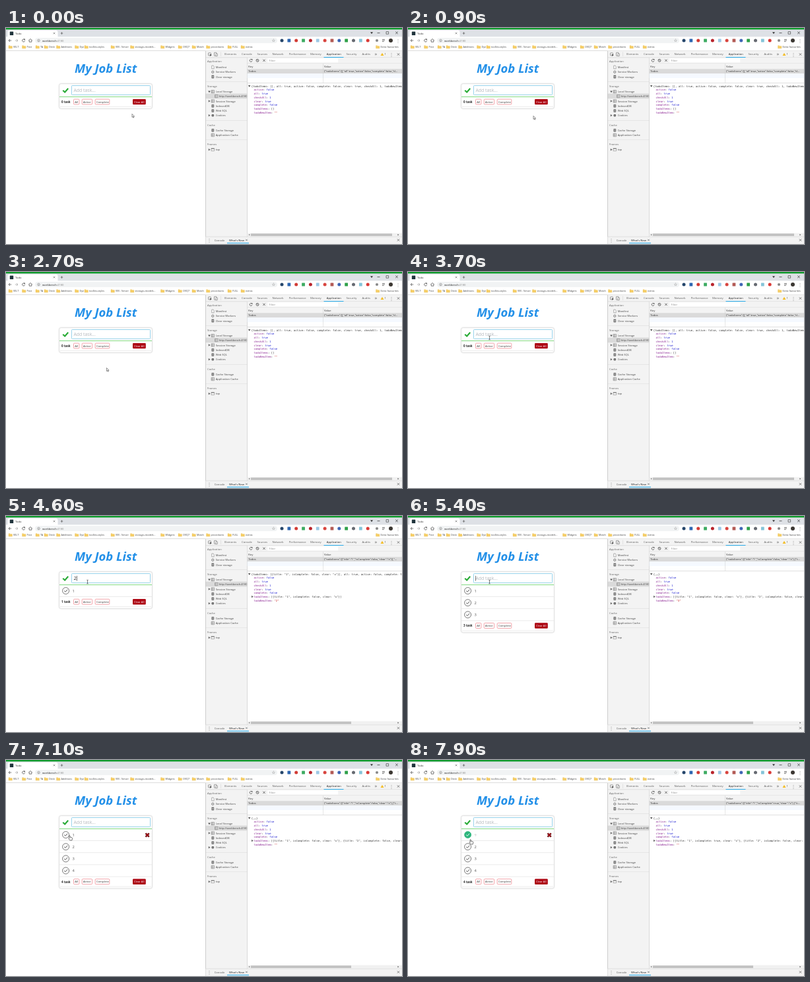
Animation of 600 by 328 pixels, one loop 8000 ms. Source, as an HTML page with a canvas:

```html
<!DOCTYPE html>
<html lang="en">
<head>
<meta charset="utf-8">
<title>Todo</title>
<style>
html, body { margin: 0; width: 100%; height: 100%; overflow: hidden; background: #fff; }
canvas { display: block; width: 600px; height: 328px; }
</style>
</head>
<body>
<canvas id="stage"></canvas>
<script>
const LOOP = 8000, ROW = 18.15, CARD_TOP = 104.5;
const UI = '"Open Sans", "Noto Sans", sans-serif';
const MONO = '"DejaVu Sans Mono", monospace';
const SYM = '"DejaVu Sans", sans-serif';
const canvas = document.getElementById('stage');
const g = canvas.getContext('2d');
const dpr = window.devicePixelRatio || 1;
canvas.width = 600 * dpr;
canvas.height = 328 * dpr;

// time, tasks in the list, text in the input, text in storage
const events = [
  [0, 0, '', ''], [4050, 0, '1', '1'], [4300, 1, '', '1'], [4500, 1, '2', '2'],
  [4750, 2, '', '2'], [5000, 2, '3', '3'], [5300, 3, '', '3'],
  [5650, 3, '4', '4'], [5950, 4, '', '4'], [6350, 4, '', '']
];
const CLICK = 7600;

// time, x, y of the pointer
const path = [
  [0, 191, 131], [900, 190, 134], [1500, 183, 142], [1900, 179, 143],
  [2400, 166, 174], [2800, 150, 141], [3400, 123, 100], [6350, 123, 100],
  [6700, 114, 171], [7050, 96, 115], [7200, 95, 115], [7500, 94, 121], [8000, 94, 121]
];

function rect(x, y, w, h, fill) {
  g.fillStyle = fill;
  g.fillRect(x, y, w, h);
}

function box(x, y, w, h, r, fill, stroke, lw = 0.7) {
  g.beginPath();
  g.roundRect(x, y, w, h, r);
  if (fill) { g.fillStyle = fill; g.fill(); }
  if (stroke) { g.strokeStyle = stroke; g.lineWidth = lw; g.stroke(); }
}

function dot(x, y, r, fill, stroke, lw) {
  box(x - r, y - r, 2 * r, 2 * r, r, fill, stroke, lw);
}

function shape(d, x, y, fill, stroke, lw = 0.7) {
  g.save();
  g.translate(x, y);
  const p = new Path2D(d);
  if (fill) { g.fillStyle = fill; g.fill(p); }
  if (stroke) { g.strokeStyle = stroke; g.lineWidth = lw; g.stroke(p); }
  g.restore();
}

// y is the baseline; returns the end of the text
function text(s, x, y, size = 4.1, color = '#444', font = UI, style = '') {
  g.font = `${style} ${size}px ${font}`;
  g.fillStyle = color;
  g.fillText(s, x, y);
  return x + g.measureText(s).width;
}

function icon(s, x, y, size = 6, color = '#666') {
  g.textAlign = 'center';
  text(s, x, y + size * 0.36, size, color, SYM);
  g.textAlign = 'left';
}

const cross = (x, y, r, color, lw) =>
  shape(`M${-r} ${-r}L${r} ${r}M${r} ${-r}L${-r} ${r}`, x, y, null, color, lw);

const arrowDown = (x, y) => shape('M-1.8 -1.2H1.8L0 1.6Z', x, y, '#555');
const arrowRight = (x, y) => shape('M-1.2 -1.8V1.8L1.6 0Z', x, y, '#666');

function reload(x, y, r = 2) {
  shape(`M${r * 0.7} ${-r * 0.7}A${r} ${r} 0 1 0 ${r} ${r * 0.3}`, x, y, null, '#555', 0.8);
  shape('M0 -2.4H2.4V0Z', x, y, '#555');
}

function folder(x, y) {
  shape('M0 -2H2L2.8 -1.2H5.4V2.2H0Z', x, y, '#f6cf68', '#e3b445', 0.3);
}

function drawBrowser() {
  rect(0, 0, 600, 13.5, '#dee1e6');
  rect(0, 0, 600, 2.3, '#119b2e');
  box(2.5, 3.6, 76, 11, [3, 3, 0, 0], '#fff');
  rect(0, 13.5, 600, 20.5, '#fff');
  box(5.8, 5.6, 5.4, 5.4, 0.5, '#20343c');
  text('Todo', 14, 9.8, 4.1, '#333');
  cross(73, 8, 1.3, '#666', 0.6);
  shape('M-1.8 0H1.8M0 -1.8V1.8', 84.5, 8, null, '#555', 0.7);
  shape('M-2 -1.2H2L0 1.6Z', 554, 7.5, '#333');
  rect(562.5, 7.2, 4, 0.7, '#333');
  box(576, 5.6, 3.6, 3.6, 0, null, '#333', 0.6);
  cross(592, 7.3, 1.8, '#333', 0.7);

  shape('M2.2 0H-2M0 -2L-2 0L0 2', 6, 19, null, '#555', 0.8);
  shape('M-2.2 0H2M0 -2L2 0L0 2', 16, 19, null, '#aaa', 0.8);
  reload(26.5, 19);
  shape('M-2.8 0L0 -2.5L2.8 0M-1.8 -.5V2.2H1.8V-.5', 37, 19, null, '#555', 0.8);
  box(44, 14.9, 367, 8.2, 4.1, '#f1f3f4');
  dot(49.5, 19, 1.8, null, '#666', 0.5);
  rect(49.2, 18.7, 0.6, 1.4, '#666');
  const end = text('workbench', 55, 20.5, 4.2, '#222');
  text(':4180', end, 20.5, 4.2, '#888');
  icon('☆', 405.5, 19, 6.5, '#555');

  ['#25466b', '#2d66b0', '#d23b35', '#3dab62', '#b8242c', '#9cc8e6', '#d8453f',
   '#b35a55', '#3f66b5', '#2fa04a', '#666a72', '#85c4d8', '#d93a36'
  ].forEach((c, i) => i % 2
    ? box(415.6 + i * 10.85, 16.6, 4.8, 4.8, 0.5, c)
    : dot(418 + i * 10.85, 19, 2.5, c));
  dot(562, 19, 2.1, '#888');
  shape('M-2 -1.2H2M-2 .4H2M-2 2H.5', 572, 18.6, null, '#555', 0.7);
  dot(583, 19, 3, '#3c3833');
  icon('⋮', 594, 19, 7);

  [[4, 'VELT'], [24.5, 'Post'], [45, 'TA'], [58, 'Desk'], [76.5, 'Additions'],
   [104.5, 'Dye'], [119, 'toolkit+styles'], [159, 'VM - Server'],
   [188.5, 'storage+models...'], [234.5, 'Widgets'], [261, 'OVQ7'], [282, 'Match'],
   [303.5, 'procedures'], [336, 'FULL'], [356, 'extras'], [560.5, 'Extra favourites']
  ].forEach(([x, s]) => {
    folder(x, 28.7);
    text(s, x + 7, 30.2, 3.75, '#444');
  });
  rect(0, 34, 600, 0.8, '#d4d4d4');
}

const tick = (x, y, k, color, lw) =>
  shape(`M${-k} 0L${-k * 0.25} ${k * 0.7}L${k} ${-k * 0.75}`, x, y, null, color, lw);

function button(s, x, y, w) {
  box(x, y, w, 8, 1.2, '#fff', '#ee8088', 0.7);
  text(s, x + 1.7, y + 5.5, 4.2, '#333');
}

function drawCard(s, hover, done, caret) {
  text('My Job List', 104, 67.6, 18.4, '#2390e8', UI, 'italic bold');
  const foot = CARD_TOP + s.count * ROW;
  g.save();
  g.shadowColor = 'rgba(0,0,0,.12)';
  g.shadowBlur = 2 * dpr;
  box(80.5, 84.5, 141, foot - 66.5, 3, '#fff', '#e0e0e0', 0.7);
  g.restore();
  rect(82, foot + 14.7, 138, 0.6, '#e2e2e2');

  tick(90.2, 94.7, 4, '#28ab35', 2.1);
  box(98.7, 86.7, 120.6, 15.6, 1.8, '#e6f5fc');
  box(99.5, 87.5, 119, 14, 1, '#fff', '#86cbe8', 0.8);
  const end = s.input ? text(s.input, 102.5, 97.4, 7.8, '#333') : 102.3;
  if (!s.input) text('Add task...', 102.5, 97.2, 6.9, '#b3b8bd');
  if (caret) rect(end, 90.8, 0.6, 7.8, '#222');
  rect(81, 104, 140, 1, '#82d982');

  for (let i = 0; i < s.count; i++) {
    const y = CARD_TOP + (i + 0.5) * ROW, checked = done && i == 0;
    dot(90.6, y, 5, checked ? '#2eb67d' : '#fff', checked ? '#2eb67d' : '#555', 0.8);
    tick(90.6, y, 2.5, checked ? '#fff' : '#444', 0.9);
    text(String(i + 1), 100.5, y + 2.1, 5.8, checked ? '#c4c4c4' : '#555');
    if (checked) rect(100.2, y, 4, 0.5, '#c4c4c4');
    if (hover == i) {
      cross(214.2, y + 0.4, 2.6, '#401010', 2.4);
      cross(214.2, y + 0.4, 2.4, '#b5121b', 1.4);
    }
    rect(81, y + ROW / 2 - 0.3, 140, 0.6, '#dedede');
  }

  text(s.count + ' task', 84, foot + 9.4, 4.5, '#222', UI, 'bold');
  button('All', 102.5, foot + 3.6, 8.4);
  button('Active', 115.2, foot + 3.6, 15.4);
  button('Complete', 135.2, foot + 3.6, 21.6);
  box(192, foot + 3.4, 19.8, 8.4, 1.2, '#ad0613');
  text('Clear All', 193.9, foot + 9.2, 4.1, '#fff');
}

function cylinder(x, y) {
  box(x - 2, y - 2.4, 4, 4.8, 1.2, '#777');
  rect(x - 2, y - 0.9, 4, 0.4, '#ddd');
  rect(x - 2, y + 0.6, 4, 0.4, '#ddd');
}

function grid(x, y) {
  box(x - 2.2, y - 2.2, 4.4, 4.4, 0, '#fff', '#777', 0.6);
  shape('M-2.2 -.7H2.2M-2.2 .8H2.2M-.6 -2.2V2.2', x, y, null, '#777', 0.5);
}

function drawSidebar() {
  rect(302.5, 45, 63, 272, '#f3f3f3');
  rect(302.5, 99.6, 63, 7.7, '#dadada');
  [['Application', 52.4], ['Storage', 90], ['Cache', 148.5], ['Frames', 178]]
    .forEach(([s, y]) => text(s, 305, y, 4.2, '#666'));
  [81, 140, 169.5].forEach(y => rect(302.5, y, 63, 0.6, '#ddd'));
  [['Manifest', 59.5], ['Service Workers', 66.8], ['Clear storage', 74],
   ['Local Storage', 96.7], ['Session Storage', 111], ['IndexedDB', 118.3],
   ['Web SQL', 125.6], ['Cookies', 132.8], ['Cache Storage', 155.3],
   ['Application Cache', 162.6], ['top', 184.7]
  ].forEach(([s, y]) => text(s, 317.7, y + 1.5, 4.1, '#444'));
  text('http://workbench:4180', 322.7, 105, 4, '#444');
  shape('M-1.5 -2.4H.8L1.8 -1.4V2.4H-1.5Z', 313.3, 59.5, '#fff', '#777', 0.6);
  dot(313.3, 66.8, 1.6, null, '#777', 1);
  [74, 118.3, 125.6, 155.3].forEach(y => cylinder(313.3, y));
  [96.7, 111, 162.6].forEach(y => grid(313.3, y));
  grid(318.7, 103.5);
  dot(313.3, 132.8, 2, '#777');
  box(311, 182.8, 4.6, 3.8, 0, '#fff', '#777', 0.6);
  rect(311, 182.8, 4.6, 1, '#777');
  arrowDown(308, 96.7);
  [111, 132.8, 184.7].forEach(y => arrowRight(308, y));
  rect(365, 45, 0.7, 272, '#ccc');
}

function drawPanel(scrollEnd) {
  rect(302, 34.8, 298, 293.2, '#fff');
  rect(302, 34.8, 298, 10.2, '#f3f3f3');
  drawSidebar();
  rect(302, 34.8, 0.7, 293.2, '#bbb');
  box(306.5, 37.8, 4, 4, 0.5, null, '#666', 0.6);
  shape('M0 0L3.6 1.4L1.8 2L1.4 3.6Z', 308.5, 39.7, '#444');
  box(315.5, 37.3, 3.4, 5, 0.4, null, '#666', 0.6);
  box(318, 39, 2.4, 3.6, 0.3, '#fff', '#666', 0.6);
  rect(325, 36.5, 0.5, 6.5, '#ccc');
  [['Elements', 331], ['Console', 357], ['Sources', 380.5], ['Network', 403.5],
   ['Performance', 428.8], ['Memory', 461], ['Application', 485.7], ['Security', 515.5],
   ['Audits', 539.5]
  ].forEach(([s, x]) => text(s, x, 41.3, 4.25, s == 'Application' ? '#222' : '#5a5a5a'));
  rect(302, 44.6, 298, 0.6, '#ccc');
  rect(481.5, 44, 30, 1, '#27a9e8');
  icon('»', 560.5, 39.5, 7);
  shape('M0 -2.3L2.5 2H-2.5Z', 570, 40, '#f3bd29');
  text('1', 573.5, 41.3, 4.2, '#555');
  icon('⋮', 584, 40, 7);
  cross(594.5, 40, 1.7, '#555', 0.7);

  rect(365.7, 45.2, 234.3, 8.4, '#f3f3f3');
  reload(371, 49.3, 1.9);
  dot(381, 49.3, 2, null, '#555', 0.8);
  shape('M-1.4 -1.4L1.4 1.4', 381, 49.3, null, '#555', 0.8);
  cross(391, 49.3, 1.7, '#555', 0.8);
  box(396.3, 46.2, 107, 6.4, 0, '#fff');
  text('Filter', 398.5, 50.9, 4.1, '#888');
  rect(365.7, 53.6, 234.3, 0.6, '#ccc');
  rect(365.7, 54.2, 234.3, 7.8, '#f3f3f3');
  text('Key', 367.3, 59.7, 4.2, '#333');
  text('Value', 482, 59.7, 4.2, '#333');
  rect(365.7, 62, 234.3, 0.5, '#ccc');
  rect(365.7, 62.5, 234.3, 6.8, '#dadada');
  rect(365.7, 69.3, 234.3, 6.8, '#f5f9ff');
  rect(480, 54.2, 0.5, 29, '#ccc');
  rect(365.7, 83, 234.3, 0.6, '#ccc');
  text('Todos', 367.3, 67.4, 4.1, '#333');

  rect(365.7, 311.5, 234.3, 5, '#f1f1f1');
  rect(371, 312.2, scrollEnd - 371, 3.7, '#c1c1c1');
  shape('M1 -1.3V1.3L-.8 0Z', 368.3, 314, '#777');
  shape('M-1 -1.3V1.3L.8 0Z', 594.5, 314, '#555');
  rect(302.5, 316.7, 297.5, 11.3, '#f3f3f3');
  rect(302.5, 316.7, 297.5, 0.6, '#ccc');
  icon('⋮', 308, 322, 7);
  text('Console', 315.7, 323.6, 4.2, '#555');
  text("What's New", 338, 323.6, 4.2, '#222');
  cross(364.5, 322, 1.3, '#555', 0.6);
  rect(335, 326, 33, 1, '#27a9e8');
  cross(594.5, 322, 1.7, '#555', 0.7);
}

function drawStorage(s, done) {
  const items = Array.from({ length: s.count }, (_, i) =>
    `{title: "${i + 1}", isComplete: ${done && i == 0}, clear: "x"}`);
  const list = `[${items.join(', ')}]`;
  const quoted = list.replace(/(\w+): /g, '"$1":').replace(/, /g, ',');
  const value = `{"todoItems":${quoted},"all":true,"active":false,"complete":false,"clear":true}`;
  const code = (str, x, y, color) => text(str, x, y, 3.95, color, MONO);

  g.font = `4.1px ${UI}`;
  let n = value.length;
  while (g.measureText(value.slice(0, n) + '…').width > 112) n--;
  text(value.slice(0, n) + '…', 482, 67.4, 4.1, '#333');

  arrowDown(368.7, 88.2);
  code(s.count > 1 ? '{,…}' : `{todoItems: ${list}, all: true, active: false, ` +
    `complete: false, clear: true, checkAll: 1, todoNewItem: "${s.stored}"}`,
    371.8, 89.6, '#333');
  const blue = '#1c1ccf';
  [['active', 'false', blue], ['all', 'true', blue], ['checkAll', '1', blue],
   ['clear', 'true', blue], ['complete', 'false', blue], ['todoItems', list, '#333'],
   ['todoNewItem', `"${s.stored}"`, '#c41a16']
  ].forEach(([key, val, color], i) => {
    const y = 95.4 + i * 5.7;
    const colon = code(key, 375.6, y, '#8a2392');
    code(val, code(': ', colon, y, '#333'), y, color);
    if (key == 'todoItems' && s.count) arrowRight(373.2, y - 1.4);
  });
}

function pointerAt(t) {
  const i = path.findIndex((p, k) => k && t <= p[0]);
  const [t0, x0, y0] = path[i - 1], [t1, x1, y1] = path[i];
  const u = (t - t0) / (t1 - t0), e = u * u * (3 - 2 * u);
  return [x0 + (x1 - x0) * e, y0 + (y1 - y0) * e];
}

function drawPointer(x, y, hover) {
  if (x > 100 && x < 218 && y > 88 && y < 102) {
    shape('M-1.2 -2.8H-.3L0 -2.4L.3 -2.8H1.2M0 -2.4V2.4M-1.2 2.8H-.3L0 2.4L.3 2.8H1.2',
      x + 0.5, y, null, '#222', 0.6);
  } else if (hover >= 0 && x < 98) {
    shape('M0 0Q.8 -.6 1.4 .2V2.2L4.3 2.9Q5 3.2 4.8 4.2L4.2 7H1.2L-1 4.2Q-.6 3.2 .2 4Z',
      x, y, '#fff', '#222', 0.6);
  } else {
    shape('M0 0V5L1.2 4L2 5.8L2.8 5.5L2 3.7H3.6Z', x, y - 0.5, '#fff', '#222', 0.5);
  }
}

function draw(t) {
  const [at, count, input, stored] = events.filter(e => e[0] <= t).pop();
  const s = { count, input, stored };
  const done = t >= CLICK;
  const [x, y] = pointerAt(t);
  const row = Math.floor((y - CARD_TOP) / ROW);
  const hover = x > 81 && x < 221 && row >= 0 && row < count ? row : -1;
  const caret = t < CLICK && (at ? (t - at) % 1000 < 500 : (t + 900) % 1000 < 500);

  g.setTransform(dpr, 0, 0, dpr, 0, 0);
  rect(0, 0, 600, 328, '#fff');
  drawBrowser();
  drawCard(s, hover, done, caret);
  drawPanel(count ? 523 : 585);
  drawStorage(s, done);
  drawPointer(x, y, hover);
}

const start = performance.now();
function frame() {
  draw((performance.now() - start) % LOOP);
  requestAnimationFrame(frame);
}
frame();
</script>
</body>
</html>
```
